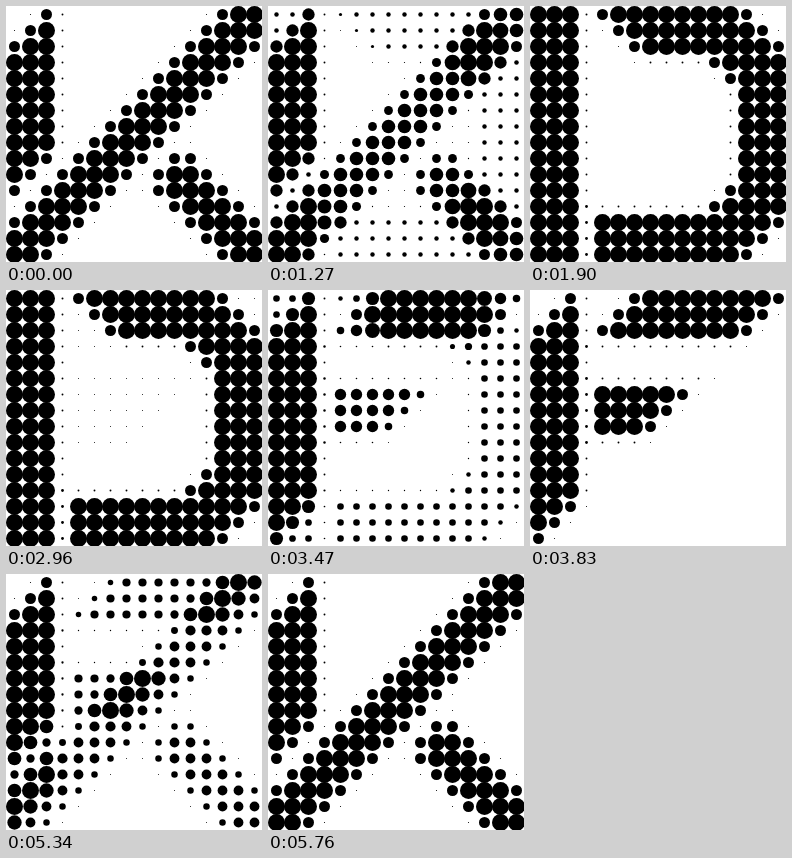
An HTML page with a canvas for the animation above (5790 ms loop, 256 px wide and 256 px high).

```html
<!DOCTYPE html>
<html lang="en">
<head>
<meta charset="utf-8">
<title>Halftone letters</title>
<style>
  html, body { margin: 0; width: 100%; height: 100%; overflow: hidden; background: #fff; }
  canvas { display: block; width: 256px; height: 256px; }
</style>
</head>
<body>
<canvas id="stage" width="256" height="256"></canvas>
<script>
const ctx = document.getElementById('stage').getContext('2d');
const { min, max, abs, floor } = Math;
const GRID = 16, CELL = 16;
const FULL = 8, EDGE = 5, SPECK = 0.05;
const PEN = 0.5; // every visible dot is at least one pixel wide
const PERIOD = 1930, HOLD = 1000, STEP = 30, STEPS = 30;

// Signed depth inside a straight edge, in cells; diagonals use i + j and i - j directly.
const upTo = (v, n) => 2 * (n + 0.54 - v);
const from = (v, n) => 2 * (v - n + 0.54);

// Each letter lists the depths of its separate strokes at column i, row j.
const letters = [
  function K(i, j) {
    const s = i + j, d = i - j;
    return [
      min(upTo(i, 2), s - 2, 11 - s),
      min(s - 13, 17 - s),
      min(2 - abs(d), s - 19)
    ];
  },
  function D(i, j) {
    const s = i + j, d = i - j;
    const top = min(upTo(j, 2), d - 4);
    const bottom = min(from(j, 13), from(i, 4));
    return [
      upTo(i, 2),
      min(13 - d, 28 - s, max(top, bottom, from(i, 13), d - 8, s - 23))
    ];
  },
  function F(i, j) {
    const s = i + j;
    const top = min(upTo(j, 2), s - 6);
    const middle = min(from(j, 6), upTo(j, 8));
    return [
      min(upTo(i, 2), s - 2, 15 - s),
      min(from(i, 4), 15 - s, max(top, middle))
    ];
  }
];

function radius(depth) {
  if (depth < -1) return 0;
  if (depth < 0) return EDGE + depth * (EDGE - SPECK);
  return EDGE + min(depth, 1) * (FULL - EDGE);
}

const maps = letters.map(letter =>
  Array.from({ length: GRID * GRID }, (_, n) => {
    const depths = letter(n % GRID, floor(n / GRID));
    return min(FULL, depths.reduce((sum, depth) => sum + radius(depth), 0));
  })
);

const ease = t => t * t * (3 - 2 * t);

function draw(time) {
  const index = floor(time / PERIOD) % maps.length;
  const step = floor((time % PERIOD - HOLD) / STEP);
  const mix = ease(max(0, min(STEPS, step)) / STEPS);
  const a = maps[index], b = maps[(index + 1) % maps.length];

  ctx.fillStyle = '#fff';
  ctx.fillRect(0, 0, 256, 256);
  ctx.fillStyle = '#000';
  for (let n = 0; n < a.length; n++) {
    const r = a[n] * (1 - mix) + b[n] * mix;
    if (!r) continue;
    const x = (n % GRID + 0.5) * CELL + 0.5;
    const y = (floor(n / GRID) + 0.5) * CELL + 0.5;
    ctx.beginPath();
    ctx.arc(x, y, r + PEN, 0, 2 * Math.PI);
    ctx.fill();
  }
}

const start = performance.now();
function tick() {
  draw(performance.now() - start);
  requestAnimationFrame(tick);
}
tick();
</script>
</body>
</html>
```
